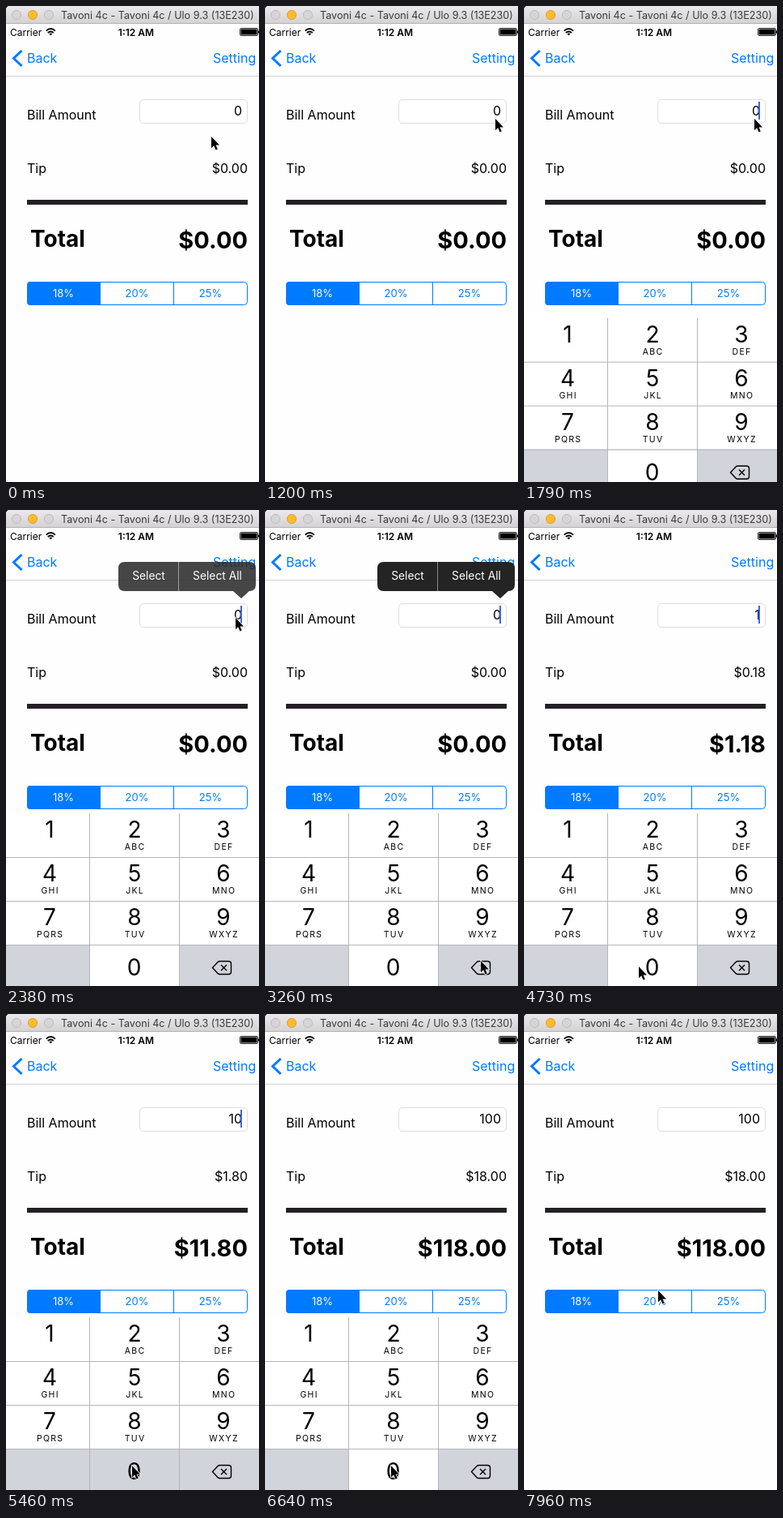
An HTML page for the animation above (8000 ms loop, 313 px wide and 587 px high).

```html
<!DOCTYPE html>
<html lang="en">
<head>
<meta charset="utf-8">
<title>Tip calculator</title>
<style>
  html, body { margin: 0; width: 100%; height: 100%; overflow: hidden; background: #fefefe; }
  svg { display: block; width: 313px; height: 587px; font: 16px Inter, Roboto, sans-serif; }
  .end { text-anchor: end; }
  .mid { text-anchor: middle; }
  .blue { fill: #007aff; }
  .bold { font-weight: 700; }
  .seg { font-size: 13px; }
  .menu { font-size: 13.8px; fill: #fff; }
  .digit { font-size: 28px; }
  .abc { font-size: 10.5px; letter-spacing: 1.3px; }
</style>
</head>
<body>
<svg viewBox="0 0 313 587">
  <defs>
    <linearGradient id="bar" x2="0" y2="1">
      <stop stop-color="#ebe9eb"/><stop offset="1" stop-color="#d3d1d3"/>
    </linearGradient>
  </defs>
  <rect width="313" height="587" fill="#fefefe"/>

  <!-- window title bar -->
  <path d="M0 0H5Q0 0 0 5z"/>
  <path d="M0 22V5Q0 0 5 0H313V22z" fill="url(#bar)"/>
  <path d="M0 21.5H313" stroke="#b4b2b4"/>
  <g fill="#d6d4d6" stroke="#bdbbbd">
    <circle cx="13" cy="11" r="5.6"/>
    <circle cx="33" cy="11" r="5.6" fill="#fdbc2f" stroke="#e0a02a"/>
    <circle cx="53" cy="11" r="5.6"/>
  </g>
  <text x="68" y="16" font-size="12.6" fill="#3c3a3c">Tavoni 4c - Tavoni 4c / Ulo 9.3 (13E230)</text>

  <!-- status bar -->
  <text x="5" y="37" font-size="12">Carrier</text>
  <g fill="none" stroke="#000" stroke-width="1.9">
    <path d="M49.7 30.6Q55.3 25.4 60.9 30.6M51.8 33Q55.3 29.8 58.8 33"/>
    <path d="M53.4 34.3Q55.3 32.7 57.2 34.3L55.3 36.4z" fill="#000" stroke="none"/>
  </g>
  <text x="161" y="37" class="mid" font-size="12" font-weight="600">1:12 AM</text>
  <rect x="289.5" y="27.5" width="22" height="9" rx="1.5" fill="none" stroke="#333"/>
  <rect x="290.5" y="28.5" width="20" height="7"/>
  <path d="M312 30.5h1v3h-1z"/>

  <!-- navigation -->
  <path d="M19.5 55L9.5 64.5L19.5 74" fill="none" stroke="#007aff" stroke-width="3"/>
  <text x="26" y="70" class="blue">Back</text>
  <text x="256" y="70" class="blue">Setting</text>
  <path d="M0 86.5H313" stroke="#d0d0d0"/>

  <!-- form -->
  <text x="26" y="140">Bill Amount</text>
  <rect x="165.5" y="115.5" width="133" height="29" rx="4.5" fill="#fff" stroke="#dcdcdc"/>
  <text id="bill" x="292" y="135" class="end"></text>
  <rect id="caret" x="290" y="118" width="2" height="22" fill="#4262e6"/>
  <text x="26" y="206">Tip</text>
  <text id="tip" x="299" y="206" class="end"></text>
  <rect x="26" y="239" width="273" height="6" fill="#231f25"/>
  <text x="30" y="297" class="bold" font-size="28">Total</text>
  <text id="total" x="299" y="299" class="bold end" font-size="29"></text>

  <!-- tip choice -->
  <rect x="26.5" y="340.5" width="272" height="28" rx="4" fill="#fff" stroke="#007aff"/>
  <path d="M117 340H30q-4 0-4 4v21q0 4 4 4h87zM207 340h1v29h-1z" class="blue"/>
  <g class="mid seg blue">
    <text x="71" y="359" fill="#fff">18%</text>
    <text x="162" y="359">20%</text>
    <text x="253" y="359">25%</text>
  </g>

  <!-- edit menu -->
  <g id="menu">
    <path d="M147 64H301q8 0 8 8V92q0 8-8 8L291 109L281 100H147q-8 0-8-8V72q0-8 8-8z" fill="#242424"/>
    <path d="M213.5 64V100" stroke="#8a8a8a"/>
    <text x="176.5" y="86" class="mid menu">Select</text>
    <text x="261.5" y="86" class="mid menu">Select All</text>
  </g>

  <!-- keyboard -->
  <g id="pad">
    <rect y="374" width="313" height="213" fill="#fff"/>
    <rect y="536" width="313" height="51" fill="#d1d4db"/>
    <rect id="key1" y="374" width="103" height="54" fill="#d1d4db"/>
    <rect id="key0" x="104" y="537" width="110" height="50"/>
    <rect id="del" x="215" y="537" width="98" height="50" fill="#fff"/>
    <path d="M0 428.5H313M0 482.5H313M0 536.5H313M103.5 374V587M214.5 374V587" stroke="#b4b6ba"/>
    <g id="labels" class="mid"></g>
    <g fill="none" stroke="#000" stroke-width="1.4">
      <path d="M255.5 564.5L262 557.5Q263 556.5 264.5 556.5H275.5Q278.5 556.5 278.5 559.5V569.5Q278.5 572.5 275.5 572.5H264.5Q263 572.5 262 571.5z"/>
      <path d="M266 561l7 7M273 561l-7 7"/>
    </g>
  </g>

  <path id="mouse" d="M0 0V14.2L3.2 11.2L5.5 16.5L7.8 15.5L5.5 10.4H10z" stroke="#fff" stroke-width="1.4" paint-order="stroke"/>
</svg>
<script>
const $ = id => document.getElementById(id);
const LOOP = 8000, TICK = 147.4;

// Keys are [tick, ...values]
const mouseKeys = [
  [0, 254, 161], [1, 279, 96], [3, 279, 96], [4, 268, 125], [5, 256, 158],
  [6, 262, 156], [8, 285, 139], [13, 285, 139], [14, 284, 133], [19, 284, 133],
  [20, 282, 180], [21, 272, 400], [22, 267, 556], [25, 266, 558], [26, 238, 535],
  [27, 99, 430], [28, 58, 400], [30, 58, 400], [31, 85, 480], [32, 142, 563],
  [33, 154, 559], [35, 156, 557], [50, 156, 557], [51, 158, 500], [52, 166, 341]
];
const padKeys = [[9, 1], [10, .75], [11, .25], [12, .05], [13, 0], [51, 0], [52, .1], [53, .7], [54, 1]];
const menuKeys = [[15, 0], [16, .84], [17, 1], [24, 1], [25, .55], [26, .13], [27, 0]];
const edits = [[0, "0"], [24, ""], [29, "1"], [37, "10"], [40, "100"]];

function at(keys, n) {
  const i = keys.findIndex(k => k[0] > n);
  if (i < 1) return (i ? keys[keys.length - 1] : keys[0]).slice(1);
  const a = keys[i - 1], b = keys[i], p = (n - a[0]) / (b[0] - a[0]);
  return a.slice(1).map((v, j) => v + (b[j + 1] - v) * p);
}

function caretAlpha(n, start) {
  if (n < 11 || n >= 52) return 0;
  const age = n - start, phase = age % 8;
  if (phase === 4 || (age > 0 && phase === 0)) return .5;
  return phase < 4 ? 1 : 0;
}

const within = (n, from, to) => n >= from && n < to;
const show = (id, on) => $(id).setAttribute("opacity", +on);
const money = v => "$" + v.toFixed(2);

const columns = [54, 159, 269];
$("labels").innerHTML = ["", "ABC", "DEF", "GHI", "JKL", "MNO", "PQRS", "TUV", "WXYZ"].map((abc, i) => {
  const x = columns[i % 3], y = 404 + 54 * Math.floor(i / 3);
  return `<text class="digit" x="${x}" y="${y}">${i + 1}</text><text class="abc" x="${x + .6}" y="${y + 15}">${abc}</text>`;
}).join("") + `<text class="digit" x="158.5" y="574">0</text>`;

function draw(now) {
  const n = Math.floor(now % LOOP / TICK);
  const [edited, text] = edits.filter(e => e[0] <= n).pop();
  const bill = Number(text);

  $("bill").textContent = text;
  $("tip").textContent = money(bill * .18);
  $("total").textContent = money(bill * 1.18);

  show("caret", caretAlpha(n, edited || 13));
  show("menu", at(menuKeys, n)[0]);
  show("key1", within(n, 29, 30));
  show("del", within(n, 23, 25));
  $("key0").setAttribute("fill", within(n, 36, 38) || within(n, 39, 41) ? "#d1d4db" : "#fff");

  $("pad").setAttribute("transform", `translate(0 ${at(padKeys, n)[0] * 214})`);
  $("mouse").setAttribute("transform", `translate(${at(mouseKeys, n)})`);
  requestAnimationFrame(draw);
}
draw(0);
</script>
</body>
</html>
```
